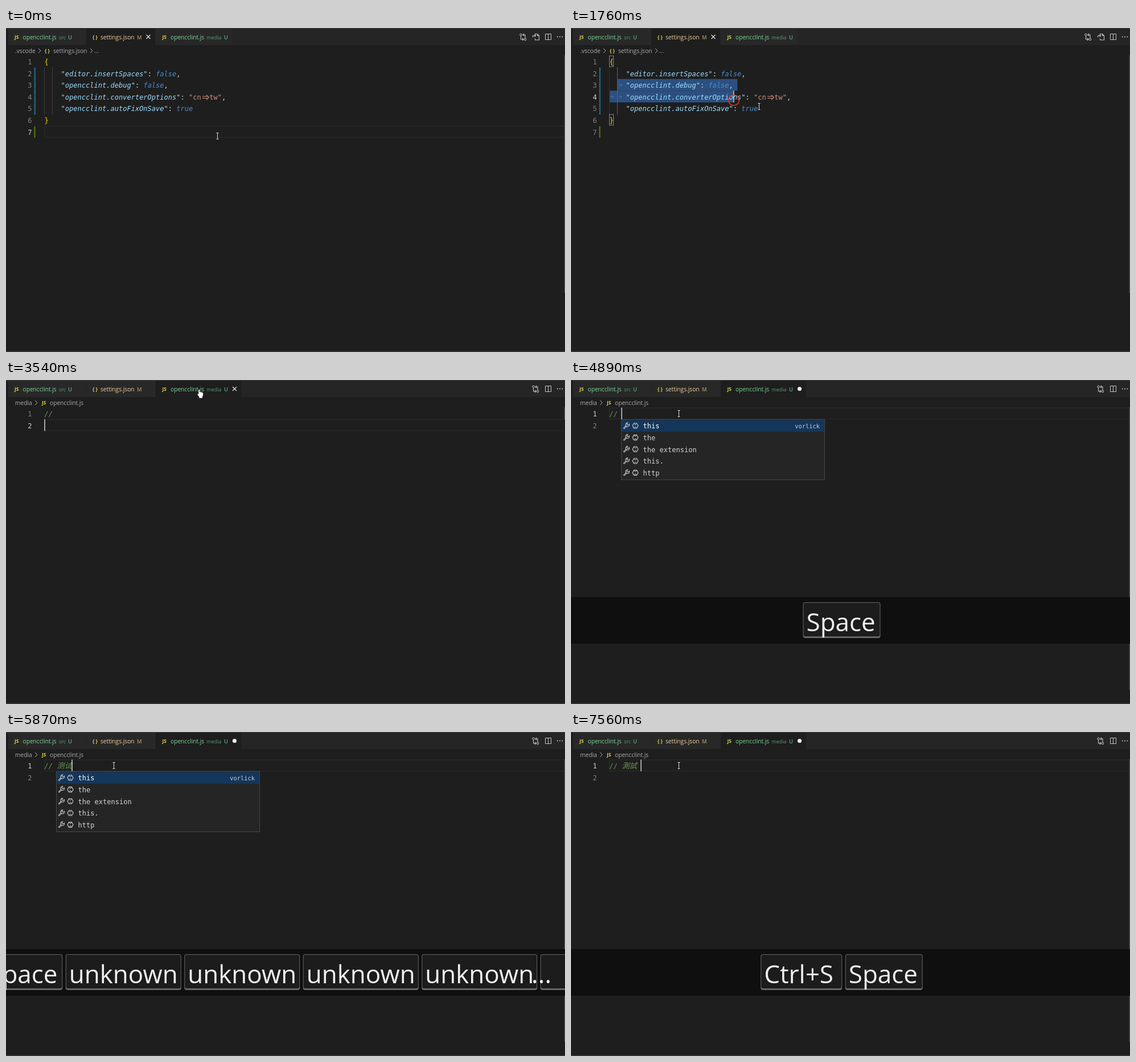
An HTML page for the animation above (8 s loop, 982 by 570 pixels).

```html
<!DOCTYPE html>
<html lang="en">
<head>
<meta charset="utf-8">
<title>Editor demo</title>
<style>
html, body { margin: 0; width: 100%; height: 100%; overflow: hidden; background: #1e1e1e; }
svg { display: block; }
text { white-space: pre; }
.ui { font: 10.2px "Open Sans", "Noto Sans", sans-serif; }
.dir { font: 8.9px "Open Sans", "Noto Sans", sans-serif; }
.badge { font: 600 9.3px "Open Sans", "Noto Sans", sans-serif; }
.type { font: 700 8.4px "Open Sans", "Noto Sans", sans-serif; }
.code { font: 12.04px "DejaVu Sans Mono", monospace; }
.origin { font: 10.4px "DejaVu Sans Mono", monospace; }
.slant { font-style: italic; }
.hans { font: italic 13.2px "Noto Sans CJK SC", sans-serif; }
.hant { font: italic 13.2px "Noto Sans CJK TC", sans-serif; }
.key { font: 44px "Open Sans", "Noto Sans", sans-serif; }
</style>
</head>
<body>
<svg id="stage" width="982" height="570" viewBox="0 0 982 570"></svg>
<script>
const LOOP = 8000;
const CW = 7.25, ROW = 20.6, TOP = 48.5, LEFT = 67.5, INDENT = 96.5;

const TICKS = [0, 150, 280, 420, 550, 680, 810, 950, 1080,
  1210, 1350, 1480, 1620, 1760, 1880, 2020, 2160,
  2310, 2440, 2570, 2710, 2840, 2970, 3120, 3250,
  3390, 3540, 3660, 3800, 3930, 4070, 4620, 4750, 4890, 5020,
  5440, 5590, 5870, 6030, 6590, 6750, 6910, 7080, 7240, 7400, 7560];

const MOUSE = [[0, 372, 190], [280, 350, 180], [810, 130, 86], [1080, 86, 101],
  [1210, 88, 101], [1350, 125, 104], [1480, 205, 114], [1620, 286, 127],
  [1760, 331, 137.5], [1880, 345, 143], [2160, 348, 147], [2310, 355, 150],
  [2840, 433, 161], [2970, 433, 159], [3120, 425, 135], [3250, 355, 37],
  [3390, 341, 24], [3540, 341, 24], [3660, 300, 32], [3930, 190, 59]];

const SETTINGS = [
  ['editor.insertSpaces', 'false', ','],
  ['opencclint.debug', 'false', ','],
  ['opencclint.converterOptions', '"cn  tw"', ','],
  ['opencclint.autoFixOnSave', 'true', '']
];

const KEY_WIDTH = { Space: 136, unknown: 203, 'Ctrl+S': 143, '': 49 };
const KEY_GAP = 5.5;
const HINTS = ['this', 'the', 'the extension', 'this.', 'http'];
const YELLOW = '#d8d848', GREEN = '#7bd69b', SAND = '#f0cf98', GREY = '#adadad';

const text = (x, y, s, fill, cls, more = '') =>
  `<text x="${x}" y="${y}" fill="${fill}" class="${cls}" ${more}>${s}</text>`;
const rect = (x, y, w, h, fill, more = '') =>
  `<rect x="${x}" y="${y}" width="${w}" height="${h}" fill="${fill}" ${more}/>`;
const line = (d, color, w = 1, more = '') =>
  `<path d="${d}" fill="none" stroke="${color}" stroke-width="${w}" ${more}/>`;
const dot = (x, y, r, fill) => `<circle cx="${x}" cy="${y}" r="${r}" fill="${fill}"/>`;
const rowTop = r => TOP + r * ROW;
const baseline = r => rowTop(r) + 15.4;
const rowLength = r => {
  const [key, value, end] = SETTINGS[r - 1];
  return key.length + 4 + value.length + end.length;
};

function mouseAt(t) {
  const i = MOUSE.findIndex(k => k[0] > t);
  if (i < 0) return MOUSE[MOUSE.length - 1].slice(1);
  const [t0, x0, y0] = MOUSE[i - 1], [t1, x1, y1] = MOUSE[i];
  const p = (t - t0) / (t1 - t0);
  return [x0 + (x1 - x0) * p, y0 + (y1 - y0) * p];
}

const chevron = x => line(`M${x - 2} 36l4 4l-4 4`, GREY);
const cross = x => line(`M${x - 3.5} 12l7 7m0 -7l-7 7`, '#e0e0e0', 1.3);
const compareIcon = x => line(
  `M${x - 3.5} 13.5v6.5h4.5m-2 -2l2 2l-2 2M${x + 4} 18v-6h-4m2 -2l-2 2l2 2`, '#c5c5c5', 1.1) +
  [[-3.5, 11.8], [4, 20]].map(([dx, y]) =>
    `<circle cx="${x + dx}" cy="${y}" r="1.8" fill="none" stroke="#c5c5c5"/>`).join('');
const openIcon = line('M929.5 12v-1.5h4l3 3v7.5h-7v-2.5M933.5 10.5v3h3', '#c5c5c5', 1.1) +
  line('M925.5 16.5v-3h5m-2 -2l2 2l-2 2', '#c5c5c5', 1.1);

function header(jsTab, mark) {
  const first = rect(4, 1, 136, 29, '#282828');
  const active = jsTab ? rect(263, 1, 150, 29, '#1e1e1e') : rect(141, 1, 121, 29, '#1e1e1e');
  const idle = jsTab ? rect(141, 1, 121, 29, '#282828') : rect(263, 1, 134, 29, '#282828');
  const scriptTab = (x, dir, badgeX) => text(x, 19, 'JS', YELLOW, 'type') +
    text(x + 14.5, 20, 'opencclint.js', GREEN, 'ui') +
    text(x + 78, 20, dir, '#5f9a76', 'dir') + text(badgeX, 20, 'U', '#5fa57b', 'badge');
  let s = rect(0, 0, 982, 30, '#252526') + rect(0, 1, 3.5, 29, '#1e1e1e') +
    first + idle + active + rect(0, 0, 982, 1.2, '#3a3a3a');
  s += scriptTab(15, 'src', 109) + scriptTab(274.5, 'media', 383);
  s += text(152, 19, '{ }', YELLOW, 'type') + text(166, 20, 'settings.json', SAND, 'ui') +
    text(230, 20, 'M', '#a38d6b', 'badge');
  if (!jsTab) s += cross(250);
  else s += mark === 'dot' ? dot(401.5, 15.5, 3.6, '#f0f0f0') : cross(401.5);
  s += compareIcon(jsTab ? 930 : 908) + (jsTab ? '' : openIcon);
  s += line('M947.5 10.5h10v10h-10zM952.5 10.5v10', '#c5c5c5');
  return s + [968.8, 973, 977.2].map(x => dot(x, 15.5, 1, '#c5c5c5')).join('');
}

function numbers(count, active) {
  let s = '';
  for (let r = 0; r < count; r++)
    s += text(45.5, baseline(r), r + 1, r === active ? '#d0d0d0' : '#808080', 'code', 'text-anchor="end"');
  return s;
}

const currentLine = r =>
  rect(LEFT, rowTop(r) + .5, 920, ROW - 1, 'none', 'stroke="#2d2d2d"');
const caret = (x, r) => rect(x - .7, rowTop(r), 1.5, ROW, '#d0d0d0');

function selection(endRow, endX) {
  let s = '';
  for (let r = 2; r <= endRow; r++) {
    const x0 = r === 2 ? 82 : LEFT;
    const x1 = r === endRow ? endX : INDENT + (rowLength(r) + 1) * CW;
    s += rect(x0, rowTop(r), Math.max(0, x1 - x0), ROW, '#2b5080');
    const marks = r === 2 ? [82] : [LEFT, 82];
    if (x1 > INDENT) for (const x of marks)
      s += line(`M${x + 1.5} ${rowTop(r) + 10.5}h5.5m-2.5 -2.5l2.5 2.5l-2.5 2.5`, '#5377a0');
  }
  if (endRow > 2) s += dot(INDENT + 19.5 * CW, rowTop(2) + 10.5, .8, '#5b7fa6');
  return s;
}

function settingsView(t, before) {
  const picked = t >= 1210 && t < 2970, closed = t >= 2970;
  let active = 6, caretX = 0, s = '';
  if (picked) {
    const [x, y] = before;
    active = Math.min(4, Math.max(2, Math.floor((y - TOP) / ROW)));
    const col = Math.min(rowLength(active), Math.round((x - INDENT) / CW));
    caretX = Math.max(82, INDENT + col * CW + .7);
    s += selection(active, caretX);
  } else {
    if (closed) { active = 5; caretX = 75; }
    s += currentLine(active);
  }
  const inside = picked || closed;
  s += line('M67.5 69v83', inside ? '#2c2c2c' : '#404040') +
    line('M81.5 69v83', inside ? '#606060' : '#404040');
  s += numbers(7, active);
  s += line('M50.8 70v82', '#173d4d', 2.4) +
    line('M50.8 70v82', '#2a87a8', 2.4, 'stroke-dasharray="1.3 1.3"') + rect(49.5, 173, 2, 20, '#587c0c');
  s += text(LEFT, baseline(0), '{', '#ffd700', 'code') + text(LEFT, baseline(5), '}', '#ffd700', 'code');
  SETTINGS.forEach(([key, value, end], i) => {
    const quoted = value[0] === '"';
    s += text(INDENT, baseline(i + 1),
      `<tspan class="slant" fill="#9cdcfe">"${key}"</tspan>: ` +
      `<tspan class="${quoted ? '' : 'slant'}" fill="${quoted ? '#ce9178' : '#4f8bcb'}">${value}</tspan>${end}`,
      '#d4d4d4', 'code');
  });
  s += line('M345 120.3h8.5m-8.5 3.2h8.5M352 118l4.5 4l-4.5 4', '#ce9178', 1.1);
  if (inside) s += [0, 5].map(r => rect(67.5, rowTop(r) + .5, 7, 19, 'none', 'stroke="#888"')).join('');
  if (caretX) s += caret(caretX, active);

  s += text(16, 43.5, '.vscode', GREY, 'ui') + chevron(59) + text(68, 43, '{ }', YELLOW, 'type') +
    text(83, 43.5, 'settings.json', GREY, 'ui') + chevron(150);
  if (t < 2020) s += text(155, 43.5, '...', GREY, 'ui');
  else s += rect(156.5, 35.5, 11, 8, 'none', 'stroke="#c5c5c5" rx="1"') +
    line('M161 37.5l-2 2l2 2m2 -4l2 2l-2 2', '#c5c5c5', 1.2) +
    text(171, 43.5, 'opencclint.autoFixOnSave', GREY, 'ui');
  return s + rect(980.6, 48, 1.4, 418, '#484848');
}

function hints() {
  let s = rect(88.5, 69.5, 357, 106, '#252526', 'stroke="#454545"') + rect(89, 70.5, 356, 20.5, '#15365b');
  HINTS.forEach((word, i) => {
    const y = 80.5 + i * 20.65, back = i ? '#252526' : '#15365b';
    s += line(`M92.5 ${y + 5}l5 -5`, '#c5c5c5', 2.6) + line(`M93 ${y + 4.5}l5 -5`, back, .8) +
      line(`M102.5 ${y - 3}a3.4 3.4 0 1 1 -2.8 -2.3l-1.8 2.5l1.9 1.7z`, '#c5c5c5', 1.1);
    s += line(`M110.5 ${y - 4.5}h5l2.5 4.5l-2.5 4.5h-5l-2.5 -4.5z`, '#d0d0d0', 1.1) +
      line(`M111 ${y - 4}l1 2h2l1 -2M111 ${y + 4}l1 -2h2l1 2`, '#d0d0d0', .8);
    s += text(126.5, y + 4.8, word, i ? '#d4d4d4' : '#fff', 'code');
  });
  return s + text(437, 85, 'vorlick', '#c8ccd2', 'origin', 'text-anchor="end"');
}

function keyBar(keys, opacity) {
  const total = keys.reduce((sum, k) => sum + KEY_WIDTH[k] + KEY_GAP, -KEY_GAP);
  let x = 475.5 - total / 2, s = rect(0, 382, 982, 82, '#0f0f0f');
  for (const k of keys) {
    const w = KEY_WIDTH[k];
    s += rect(x, 391, w, 63, '#666', 'rx="4"') + rect(x + 1, 392, w - 2, 59, '#1c1c1c', 'rx="3"') +
      text(x + 6, 442, k, '#f0f0f0', 'key');
    x += w + KEY_GAP;
  }
  if (total > 982) s += text(923, 442, '...', '#f0f0f0', 'key');
  return `<g opacity="${opacity}">${s}</g>`;
}

function keysAt(t) {
  if (t < 5440) return ['Space'];
  if (t < 5590) return ['Space', 'unknown', 'unknown'];
  if (t < 6590) return ['Space', ...Array(4).fill('unknown'), ''];
  return t < 7240 ? ['Ctrl+S'] : ['Ctrl+S', 'Space'];
}

function scriptView(t) {
  const row = t < 3930 ? 1 : 0;
  let s = currentLine(row) + numbers(2, row);
  s += text(LEFT, baseline(0), '//', '#6a9955', 'code slant');
  const pinyin = t < 5440 || t >= 5870 ? '' : t < 5590 ? 'ce' : 'ceshi';
  let x = row ? LEFT + .5 : t < 4620 ? 82 : 89;
  if (pinyin) {
    s += text(89, baseline(0), pinyin, '#6a9955', 'code slant');
    x += pinyin.length * CW;
  } else if (t >= 5870) {
    const saved = t >= 6750;
    s += text(89.5, baseline(0), saved ? '測試' : '测试', '#6a9955', saved ? 'hant' : 'hans');
    x = t >= 7240 ? 123 : 116;
  }
  s += caret(x, row);
  s += text(16, 43.5, 'media', GREY, 'ui') + chevron(53) + text(63, 43, 'JS', YELLOW, 'type') +
    text(77, 43.5, 'opencclint.js', GREY, 'ui');
  s += rect(980.6, 48, 1.4, t < 3660 ? 21 : 497, '#484848');
  if (t >= 4890 && t < 6030) s += hints();
  if (t >= 4750) s += keyBar(keysAt(t), t < 4890 ? .5 : 1);
  return s;
}

function pointer([x, y]) {
  if (y < 30) return `<path transform="translate(${x} ${y})" fill="#fff" stroke="#222" stroke-width=".8"
    d="M-3 -7q1.5 -1.5 2.6 0v4q1.5 -1 2 .3q1.5 -.6 2 .6q1.8 -.3 1.8 1.2v4l-1.3 3v2h-6v-2l-3.3 -5q0 -1.6 2.2 -.5z"/>`;
  const cx = Math.round(x) - .5, cy = Math.round(y);
  return line(`M${cx - 2} ${cy - 5.5}h4M${cx} ${cy - 5}v10M${cx - 2} ${cy + 5.5}h4`, '#dcdcdc');
}

const clicking = t => (t >= 1210 && t < 2160) || t === 2970 || t === 3930;

function draw(i) {
  const t = TICKS[i], mouse = mouseAt(t), before = mouseAt(TICKS[Math.max(0, i - 1)]);
  const jsTab = t >= 3390;
  const dirty = t >= 4620 && (t < 6750 || t >= 7240);
  let s = rect(0, 0, 982, 570, '#1e1e1e') + header(jsTab, dirty ? 'dot' : 'cross');
  s += jsTab ? scriptView(t) : settingsView(t, before);
  s += rect(0, 566, 982, 1.5, '#191919') + rect(0, 567.5, 982, 2.5, '#303030');
  if (clicking(t)) {
    const [x, y] = jsTab ? mouse : before;
    s += `<circle cx="${x}" cy="${y}" r="9.3" fill="none" stroke="#e0341f" stroke-width="1.6"/>`;
  }
  stage.innerHTML = s + pointer(mouse);
}

const stage = document.getElementById('stage');
const start = performance.now();
let shown = -1;
function update(now) {
  const t = Math.max(0, now - start) % LOOP;
  let i = TICKS.length - 1;
  while (TICKS[i] > t) i--;
  if (i !== shown) draw(shown = i);
  requestAnimationFrame(update);
}
update(start);
</script>
</body>
</html>
```
